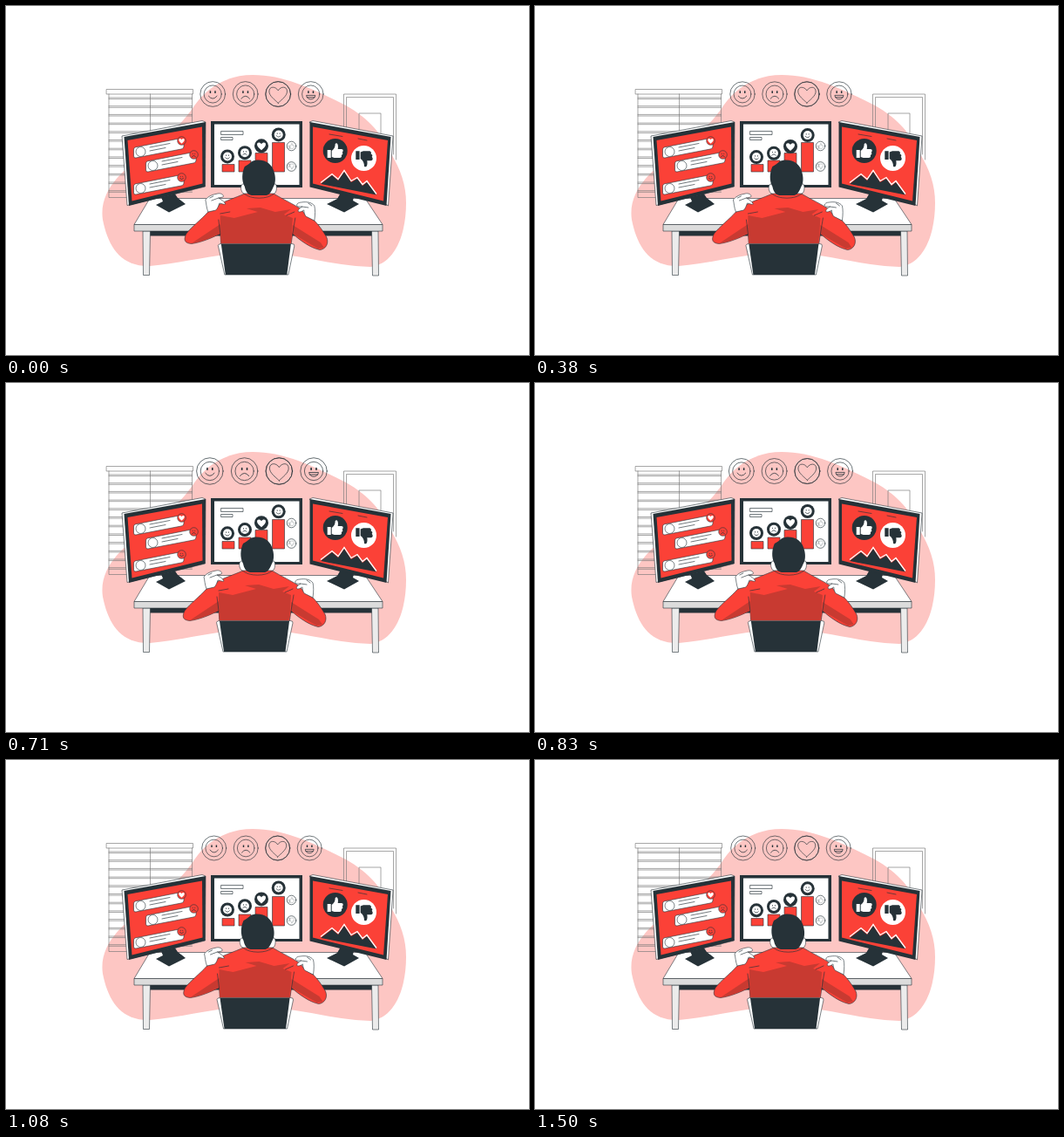
Write an HTML page that moves like this. It is 600 px wide and 400 px high and loops after 1540 ms.

```html
<!DOCTYPE html>
<html lang="en">
<head>
<meta charset="utf-8">
<title>Social media desk</title>
<style>
html, body { margin: 0; width: 100%; height: 100%; overflow: hidden; background: #fff; }
svg { display: block; width: 600px; height: 400px; }
.ln { fill: none; stroke: #263238; stroke-width: .65; stroke-linejoin: round; stroke-linecap: round; }
.thin { stroke: #777; stroke-width: .65; }
.dark { fill: #263238; }
.red { fill: #fb4137; }
.white { fill: #fff; }
.edge { stroke: #263238; stroke-width: .6; stroke-linejoin: round; }
</style>
</head>
<body>
<svg viewBox="0 0 600 400" xmlns="http://www.w3.org/2000/svg">
  <defs>
    <path id="heart" d="M0 9C-4 5-10 1-10-4C-10-10-3-10 0-5C3-10 10-10 10-4C10 1 4 5 0 9Z"/>
    <path id="thumb" d="M-9-1H-5V8H-9ZM-4 0C-1-2 0-5 0-8C2-10 4-7 3-2H7C10-2 9 1 8 2C9 3 9 4 7 5C8 6 7 8 5 8H-1L-4 7Z"/>
  </defs>

  <path fill="#fdc6c3" d="M283 79C253 79 230 94 217 113C201 137 185 149 165 166C136 186 106 210 111 245C117 275 131 299 165 298C202 295 235 285 276 283C329 281 370 298 418 299C446 296 459 262 459 226C459 205 453 188 441 168C430 145 414 126 384 111C350 94 318 79 283 79Z"/>

  <g class="ln thin">
    <path d="M115.500 95.500H214.500V101H115.500ZM118 101V219.500H150M213.500 101V140M165.500 101V150"/>
    <path id="slats"/>
    <path d="M387.500 150V101H447.500V176M390.500 150V104.500H444.500V170M405 150V123H430V150"/>
  </g>

  <g id="wall"></g>

  <!-- desk -->
  <path class="dark" d="M160 258H425V263.500H160Z"/>
  <path class="edge" fill="#ececec" d="M157 258H165.500L164.500 308.500H157.500ZM419.500 258H427L427.500 309H420.500Z"/>
  <path class="white edge" d="M165 220.500H412L432 250.500H147Z"/>
  <path class="edge" fill="#dcdcdc" d="M147 250.500H432V258H147Z"/>

  <!-- centre monitor -->
  <path class="dark" d="M235 132H340V208H235Z"/>
  <path class="white" d="M239 135.500H336.500V205H239Z"/>
  <path class="ln" d="M247 143.500H272V147.500H247ZM247 150.500H260V153.500H247Z"/>
  <path class="red edge" d="M248 181.500H262V190H248ZM267 177H281V190H267ZM286 168.500H300V190H286ZM305.500 156.500H319.500V190H305.500Z"/>
  <g id="likes"></g>
  <g id="chart"></g>

  <!-- left monitor -->
  <path class="dark" d="M178 219L193 214L197 220L206 227L187 236.500L172 228L180 224Z"/>
  <path class="white edge" d="M133 149L225 131.500L229 133L228.500 207L139 228.500Z"/>
  <path class="dark" d="M135.500 150L229 133L228.500 207L141 229Z"/>
  <path class="red" d="M139.500 154L225 138.500L225.500 203.500L144.500 223.500Z"/>
  <g id="cards"></g>

  <!-- right monitor -->
  <path class="dark" d="M384 214L399 219L398 223L405 227L388 236.500L368 227L380 221Z"/>
  <path class="white edge" d="M348 133L352 131.500L444 149L438.500 229L434 226Z"/>
  <path class="dark" d="M348.500 133L441.500 150L436.500 229L348.500 207.500Z"/>
  <path class="red" d="M352 138.500L438 154L433 223.500L352 203.500Z"/>
  <path class="ln" d="M371 147L386 149.500M404 152L414 154"/>
  <circle class="dark" cx="377.700" cy="166" r="14"/>
  <use href="#thumb" class="white" transform="translate(377.700 166)"/>
  <circle class="white" cx="410.500" cy="174.500" r="14.500"/>
  <use href="#thumb" class="dark" transform="translate(411 175) scale(1.080 -1.080)"/>
  <path class="dark" d="M361 204L374 194L381 200L388 190L396 202L403 198L409 206L414 202L425 216.500Z"/>
  <path fill="none" stroke="#fff" stroke-width="1.300" d="M361 202.500L374 192.500L381 198.500L388 188.500L396 200.500L403 196.500L409 204.500L414 200.500L425 215.500"/>

  <g id="person">
    <path class="white edge" d="M271.500 204C268 207 270 214 274 216H306C310 216 312 208 309.500 204Z"/>
    <path class="red edge" d="M274 215C263 220 252 223 244 228L241 233L232 236C224 245 213 253 207 261C203 269 206 272 213 272.500C224 271 236 266 246 261L247 275H327L329 261C338 269 349 277 360 279.500C367 279 371 272 368 265C364 258 359 251 354 246L344 240L339 233C330 227 319 222 307 215Z"/>
    <path fill="#c83a31" d="M246 240L262 243L289 236L276 232L292 231L309 236L327 233L319 239L329 243L328 261L326 275H247L246 254ZM246 250L231 260L213 272L226 269L246 261ZM329 251L345 261L361 271L365 277L358 278L329 261Z"/>
    <path class="ln" d="M273 215C281 222 300 222 308 215M246 261L244 245M329 261L332 243M246 238L257 236M331 236L322 240"/>
    <path class="white edge" d="M232 236C230 231 230 226 229 222C232 218 237 216 243 215C247 214 251 217 249 219L244 220C247 222 251 224 252 227C250 228 247 226 245 226C244 229 243 232 241 234Z"/>
    <path class="white edge" d="M354 246C355 239 355 233 354 229C351 225 345 224 339 225C335 225 332 228 335 230L340 230C337 232 334 234 336 236C340 236 341 234 342 234C342 237 343 239 344 241Z"/>
    <path class="ln" d="M234 220L238 218M236 223L244 220M347 226L351 229M340 230L347 231"/>
    <path class="dark" d="M274 207C270 200 271 190 274 184C279 182 281 177 288 176.500C299 176 306 182 308 191C310 198 309 204 307 207C305 212 303 216 299 217H282C277 216 275 212 274 207Z"/>
    <path class="white edge" d="M243.500 274.500Q244 272.500 247 272.500H328Q331.500 272.500 331 275L324 308H251Z"/>
    <path class="dark" d="M247 273H327L322.500 308H252Z"/>
  </g>
</svg>
<script>
const $ = id => document.getElementById(id);
const LOOP = 1540, CYCLE = 1500;

const use = (id, cls, x, y, s, turn = '') =>
  `<use href="#${id}" class="${cls}" transform="translate(${x} ${y}) ${turn} scale(${s})"/>`;

// mood: 1 smile, -1 frown, 2 open grin; k is the size
function face(mood, k) {
  const y = mood < 0 ? 6 : 2;
  const mouth = mood === 2
    ? 'M-5.5 1.5H5.5C5 8-5 8-5.5 1.5ZM-5 4H5'
    : `M-5.5 ${y}Q0 ${y + mood * 7} 5.5 ${y}`;
  return `<g transform="scale(${k})" fill="none" stroke="#263238" stroke-width="${0.75 / k}">
    <path d="M-3-4V-1M3-4V-1" stroke-width="1.6"/><path d="${mouth}"/></g>`;
}

let d = '';
for (let i = 0; i < 12; i++) {
  const y = 105 + i * 9.7;
  d += `M118 ${y}H213.5M118 ${y + 1.6}H213.5`;
}
$('slats').setAttribute('d', d);

$('wall').innerHTML = [1, -1, 0, 2].map((mood, i) => `
  <g transform="translate(${238.7 + i * 36.5} 101)">
    <circle class="ln" r="14"/>
    ${mood ? `<circle class="ln" r="9.8"/>` + face(mood, 0.9)
      : `<circle class="ln" r="14"/>` + use('heart', 'ln', 0, 1, 1)}
  </g>`).join('');

$('chart').innerHTML = [[254, 172.3], [274, 168], [293, 160.2], [312.7, 147.3]].map(([x, y], i) => `
  <g transform="translate(${x} ${y})"><g>
    <circle class="dark" r="8"/>
    ${i === 2 ? use('heart', 'white', 0, 0.5, 0.5)
      : `<circle class="white" r="5"/>${face(i === 1 ? -1 : 1, 0.48)}`}
  </g></g>`).join('');
const badges = [...$('chart').children].map(g => g.firstElementChild);

$('likes').innerHTML = [160.5, 184].map((y, i) =>
  `<circle class="ln" cx="327.5" cy="${y}" r="5.3"/>` +
  use('thumb', 'ln', 327.5, y, 0.36, i ? 'scale(1 -1)' : '')).join('');

$('cards').innerHTML = [[146, 162], [160, 178], [146, 204]].map(([x, y], i) => `
  <g transform="translate(${x} ${y})">
    <path class="white edge" d="M2 0L55-10.5Q58-11 58-8V-1Q58 1.5 55 2L3 12Q.5 12.500 .5 10V3Q.5 .5 2 0Z"/>
    <circle class="white edge" cx="8.500" cy="5" r="5.5"/>
    <path class="ln" d="M19 0L42-4.500M19 4L37 .5"/>
    <circle class="red edge" cx="55.5" cy="-7.5" r="4.8"/>
    ${i ? `<g transform="translate(55.5 -7.5)">${face(i === 1 ? -1 : 1, 0.4)}</g>`
      : use('heart', 'white', 55.5, -7.2, 0.32)}
  </g>`).join('');

// linear keyframes: [percent, value] pairs
function tween(keys, p) {
  let i = 1;
  while (i < keys.length - 1 && p > keys[i][0]) i++;
  const [a, v] = keys[i - 1], [b, w] = keys[i];
  return v + (w - v) * Math.min(1, (p - a) / (b - a));
}
const beat = [[0, 1], [10, 1.1], [30, 1], [40, 1], [50, 1.1], [60, 1], [100, 1]];
const shake = [[0, 0], [10, -1], [20, 2], [30, -4], [40, 4], [50, -4], [60, 4], [70, -4], [80, 2], [90, -1], [100, 0]];

function draw(t) {
  const p = Math.min(100, (40 + t * CYCLE / LOOP) / CYCLE * 100);
  const k = tween(beat, p);
  $('wall').setAttribute('transform', `translate(293.4 101) scale(${k}) translate(-293.4 -101)`);
  $('person').setAttribute('transform', `translate(${tween(shake, p) * 0.65} 0)`);
  const bob = 0.8 * Math.sin(p / 50 * Math.PI);
  badges.forEach(b => b.setAttribute('transform', `translate(0 ${bob})`));
}

const start = performance.now();
function tick() {
  draw((performance.now() - start) % LOOP);
  requestAnimationFrame(tick);
}
draw(0);
requestAnimationFrame(tick);
</script>
</body>
</html>
```
